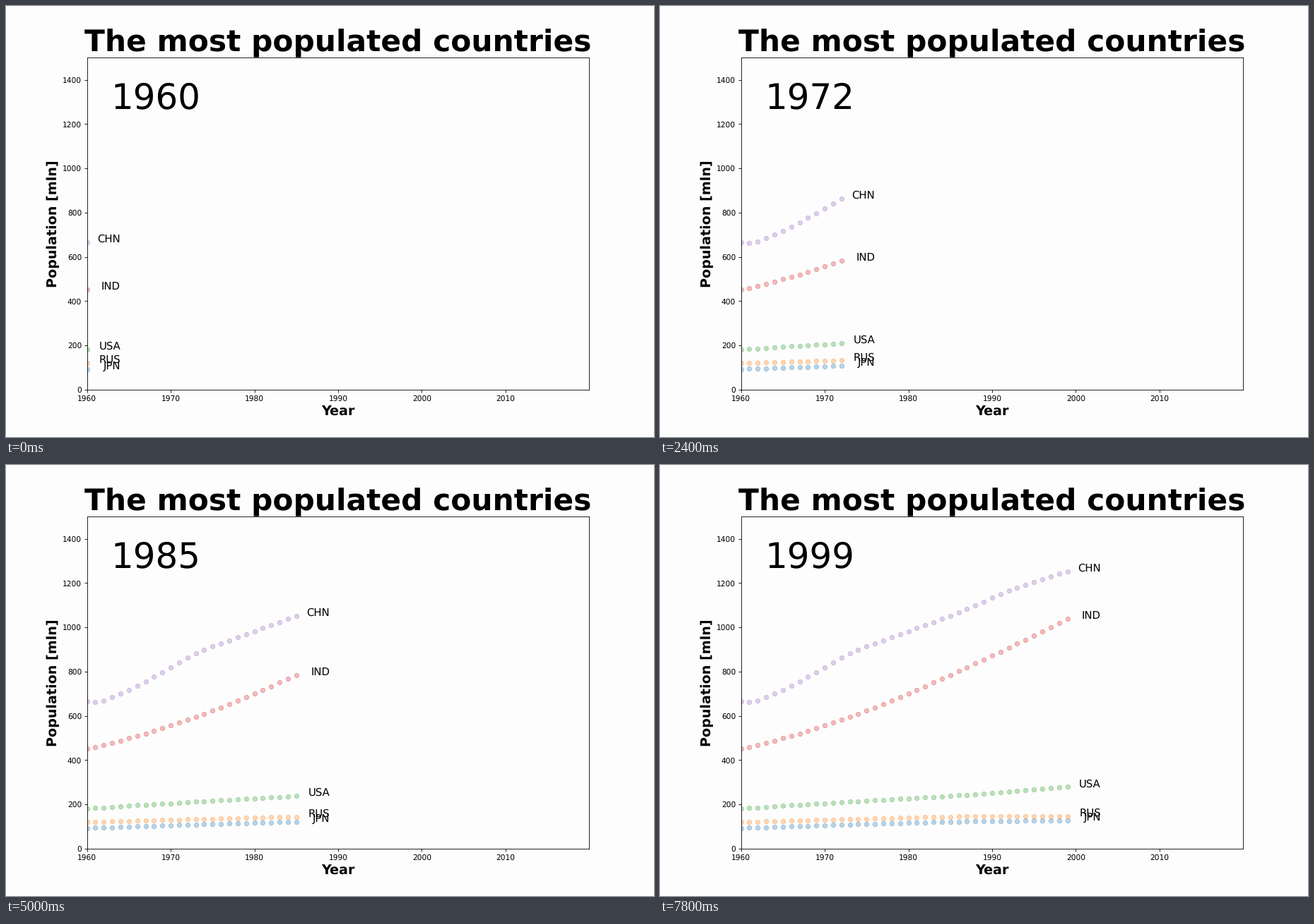
Write a matplotlib script that moves like this. It is 917 px wide and 611 px high and loops after 8 s.

```python
import matplotlib.pyplot as plt
import numpy as np
from matplotlib.animation import FuncAnimation

W, H, DPI = 917, 611, 76.4
START, FRAMES, STEP_MS = 1960, 40, 200
LABEL_SHIFT = 4
PAPER = "#fdfdfd"

plt.rcParams["text.hinting"] = "no_hinting"

t = np.arange(FRAMES)
years = START + t


def smooth(*knots):
    """Cubic Hermite curve through evenly spaced knots, one value per year."""
    p = np.array(knots)
    m = np.gradient(p, edge_order=2)
    u = np.linspace(0, len(p) - 1, FRAMES)
    k = np.minimum(u.astype(int), len(p) - 2)
    s = u - k
    return ((1 + 2 * s) * (1 - s) ** 2 * p[k] + s * (1 - s) ** 2 * m[k]
            + s ** 2 * (3 - 2 * s) * p[k + 1] + s ** 2 * (s - 1) * m[k + 1])


# Population in millions; China starts with a short dip.
population = {
    "JPN": smooth(92.5, 108.7, 121.5, 126.6),
    "RUS": smooth(119.9, 132.7, 144.9, 147.2),
    "USA": smooth(180.7, 211.9, 240.1, 279.0),
    "IND": smooth(450.5, 594.8, 802.0, 1038.1),
    "CHN": smooth(634, 745, 882, 975, 1067, 1172, 1253) + 33 * np.exp(-t),
}

fig, ax = plt.subplots(figsize=(W / DPI, H / DPI), dpi=DPI, facecolor=PAPER)
ax.set_facecolor(PAPER)
ax.set_xlim(1960, 2020)
ax.set_ylim(0, 1500)
ax.set_xticks(range(1960, 2020, 10))
ax.set_title("The most populated countries", fontsize=40, weight="bold")
ax.set_xlabel("Year", fontsize=18, weight="bold")
ax.set_ylabel("Population [mln]", fontsize=18, weight="bold")
counter = fig.text(0.162, 1 - 145 / H, "", fontsize=47)


def make_series(code, values, color):
    dots = ax.scatter([], [], color=color, alpha=0.3)
    label = ax.text(0, 0, code, fontsize=14, ha="right")
    return values, dots, label


series = [make_series(code, values, f"C{n}")
          for n, (code, values) in enumerate(population.items())]


def draw(i):
    counter.set_text(str(years[i]))
    for values, dots, label in series:
        dots.set_offsets(np.column_stack((years, values))[:i + 1])
        label.set_position((years[i] + LABEL_SHIFT, values[i]))
    return [counter]


anim = FuncAnimation(fig, draw, frames=FRAMES, init_func=lambda: draw(0),
                     interval=STEP_MS, repeat=True, repeat_delay=0)
plt.show()
```
